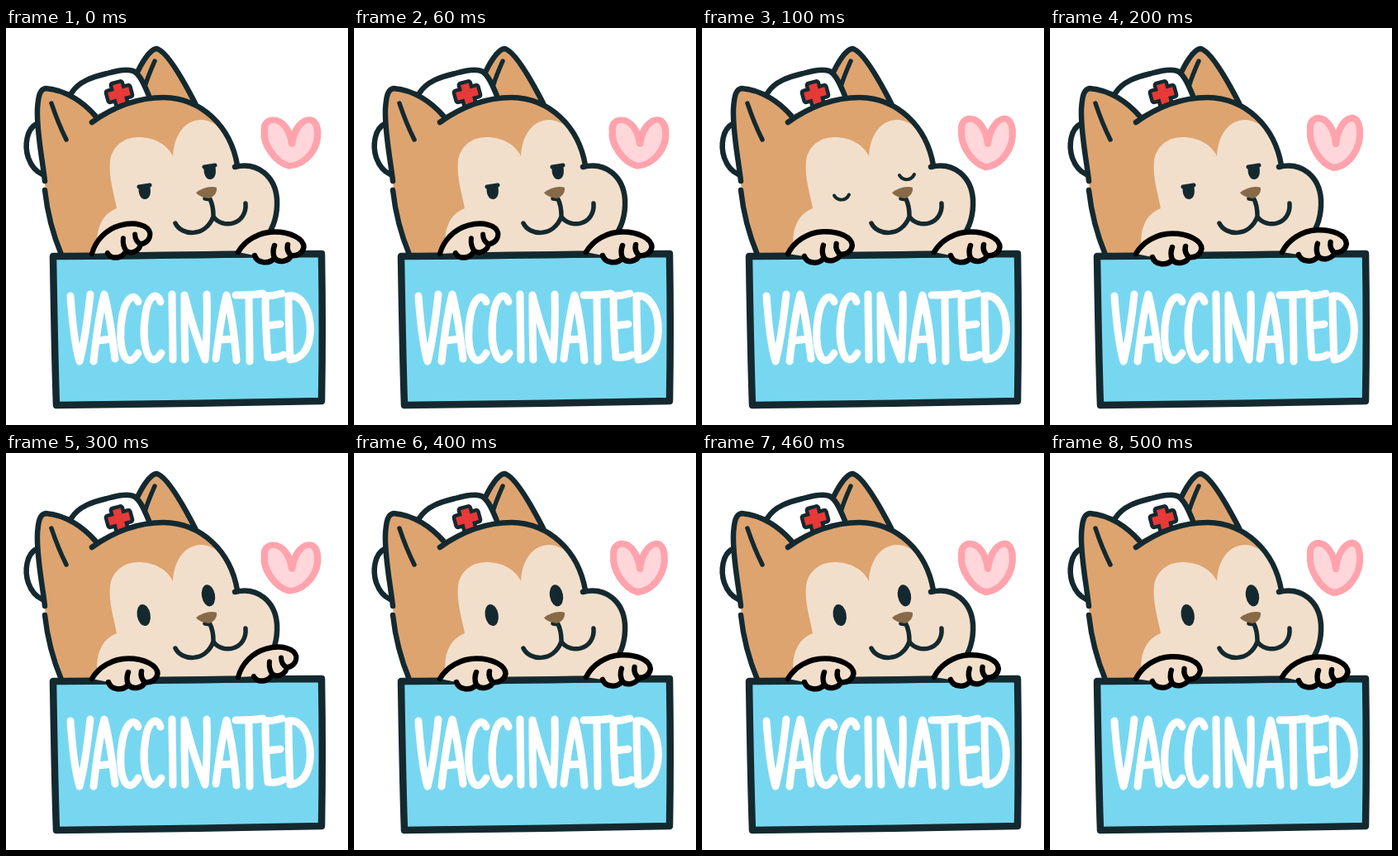
An HTML page with a canvas for the animation above (600 ms loop, 414x480 px).

```html
<!DOCTYPE html>
<html lang="en">
<head>
<meta charset="utf-8">
<title>Vaccinated pup</title>
<style>
html, body { margin: 0; width: 100%; height: 100%; overflow: hidden; background: #fff; }
canvas { display: block; }
</style>
</head>
<body>
<canvas id="stage" width="414" height="480" role="img" aria-label="A dog holding a sign: VACCINATED"></canvas>
<script>
const ctx = document.getElementById('stage').getContext('2d');
const INK = '#14292f', TAN = '#dda470', CREAM = '#f2dfcb', SKY = '#78d7f0', PINK = '#ffa3ad';
const STEP = 100, STEPS = 6;

const shape = d => new Path2D(d);

const art = {
  farEar: shape('M157 58C164 42 174 26 182 25C194 27 213 60 229 91L200 100L160 84Z'),
  farEarLine: shape('M157 58C164 42 174 26 182 25C194 27 213 60 229 91'),
  farEarFold: shape('M180 40C176 49 172 58 168 71'),
  hatBack: shape('M37 116C25 122 22 142 27 157C31 168 37 174 44 177L60 140Z'),
  hatBackLine: shape('M37 116C25 122 22 142 27 157C31 168 37 174 44 177'),
  hat: shape('M79 79C88 64 106 59 122 55C136 51 150 49 156 53C163 58 168 70 173 82L104 116Z'),
  hatLine: shape('M79 79C88 64 106 59 122 55C136 51 150 49 156 53C163 58 168 70 173 82'),
  head: shape('M67 274C57 249 51 222 47 188C44 158 37 126 38 98C39 82 41 74 48 73C73 75 94 90 108 106C134 93 163 84 191 84C237 85 272 119 280 167C305 161 326 180 328 207C329 227 323 243 314 254L300 276Z'),
  mask: shape('M112 276C106 244 116 225 134 218C131 201 124 181 126 161C128 143 143 132 160 132C181 132 196 142 202 155C203 133 214 111 237 111C259 112 274 136 280 167C305 161 326 180 328 207C329 227 323 243 314 254L300 276Z'),
  earLine: shape('M47 185C44 158 37 126 38 98C39 82 41 74 48 73C73 75 94 90 108 106'),
  earFold: shape('M55 91C60 106 66 121 73 135'),
  sideLine: shape('M47 196C50 223 57 250 67 274'),
  topLine: shape('M104 114C132 94 163 84 191 84C237 85 272 119 280 166'),
  cheekLine: shape('M277 168C305 161 326 180 328 207C329 227 323 243 314 254'),
  cross: shape('M-5 -12H5V-5H13V5H5V12H-5V5H-13V-5H-5Z'),
  nose: shape('M230 199C236 194 248 190 255 193C256 199 251 205 245 206C239 205 233 203 230 199Z'),
  mouth: shape('M241 206L247 207C250 213 251 220 251 227M205 236C212 251 241 254 251 228C262 244 292 238 290 212'),
  sign: shape('M57 276C160 276 270 273 382 273C383 330 383 395 382 451C280 453 160 455 61 456C59 400 58 335 57 276Z'),
  paw: shape('M104 273C112 259 129 248.5 148 248.5C168 248.5 183.5 257 183.5 267C182 275 175 278 168 277C166 284 153 287 148 280C142 288 127 287 124 277Z'),
  pawLine: shape('M104 273C112 259 129 248.5 148 248.5C168 248.5 183.5 257 183.5 267C182 275 175 278 168 277C166 284 153 287 148 280C142 288 127 287 124 277M148 280C146 275 146 270 148 265M168 277C164 273 163 268 164 264'),
  heart: shape('M346 140C344 122 335 109 325 109C318 109 314 115 315 123C313 141 327 164 343 169C362 167 377 146 375 123C374 113 370 108 364 109C355 111 348 124 346 140Z')
};

const letters = [
  'M78 324C80 352 83 383 89 403C95 380 99 350 102 322',
  'M106 403C109 375 113 345 119 322C125 345 129 375 132 400M111 378L128 376',
  'M160 331C155 319 145 327 141 347C134 383 144 419 160 393',
  'M187 331C182 317 172 325 169 345C163 382 173 417 188 393',
  'M201 322C201 348 202 375 202 401',
  'M217 401C216 376 216 348 216 323C223 350 232 379 241 401C243 375 244 347 243 322',
  'M254 400C257 376 261 346 267 323C273 346 277 376 279 402M257 377L276 376',
  'M278 323C289 323 301 323 311 321M294 324C294 350 295 377 295 403',
  'M334 321C327 323 320 324 314 324C314 350 315 375 317 398C324 399 331 398 336 395M315 360L332 358',
  'M342 324C342 350 343 376 344 401C363 399 370 380 368 357C366 335 355 322 342 324'
].map(shape);

function fill(path, color) {
  ctx.fillStyle = color;
  ctx.fill(path);
}

function line(path, width = 6.5, color = INK) {
  ctx.lineWidth = width;
  ctx.strokeStyle = color;
  ctx.stroke(path);
}

function at(x, y, turn, draw) {
  ctx.save();
  ctx.translate(x, y);
  ctx.rotate(turn * Math.PI / 180);
  draw();
  ctx.restore();
}

function drawHead() {
  fill(art.farEar, TAN);
  line(art.farEarLine);
  line(art.farEarFold, 5.5);
  fill(art.hatBack, '#fff');
  line(art.hatBackLine);
  fill(art.hat, '#fff');
  line(art.hatLine);
  at(137, 79.5, -15, () => {
    line(art.cross, 9);
    fill(art.cross, '#e63a38');
  });
  fill(art.head, TAN);
  fill(art.mask, CREAM);
  [art.earLine, art.sideLine, art.topLine, art.cheekLine].forEach(p => line(p));
  line(art.earFold, 5.5);
  line(art.mouth, 5.5);
  fill(art.nose, '#876a48');
}

const closedEye = shape('M-9 -3C-5 4 5 4 9 -4');
const halfEye = shape('M-6 -6C-8 4 -3 11 2 10C8 9 9 1 7 -7Z');
const lid = shape('M-6 -5L7 -7');
const openEye = new Path2D();
openEye.ellipse(0, 0, 8, 13.2, 0, 0, Math.PI * 2);

function drawEyes(mood) {
  if (mood === 'closed') {
    at(169, 205.5, 0, () => line(closedEye, 4));
    at(248, 181, 0, () => line(closedEye, 4));
  } else if (mood === 'half') {
    for (const [x, y] of [[167, 197], [246, 173]]) {
      at(x, y, 0, () => {
        fill(halfEye, INK);
        line(lid, 5);
      });
    }
  } else {
    at(166.7, 196, -10, () => fill(openEye, INK));
    at(245, 172.3, -10, () => fill(openEye, INK));
  }
}

function drawSign() {
  fill(art.sign, SKY);
  line(art.sign, 8.5);
  letters.forEach(p => line(p, 9, '#fff'));
}

// A paw pivots on its wrist and foreshortens as it lifts around its peak step.
function drawPaw(dx, dy, peak, step) {
  const away = Math.abs(step - peak);
  const lift = [14, 3, 0, 0][Math.min(away, STEPS - away)];
  at(104 + dx, 273 + dy, 0, () => {
    ctx.scale(1 - lift * 0.005, 1);
    ctx.rotate(-lift * Math.PI / 180);
    ctx.translate(-104, -273);
    fill(art.paw, CREAM);
    line(art.pawLine, 6.5, '#000');
  });
}

function drawHeart(step) {
  const squash = [0.07, 0.025, 0][step % 3];
  at(345, 139, 0, () => {
    ctx.scale(1 + squash, 1 - squash);
    ctx.translate(-345, -139);
    fill(art.heart, '#ffd6da');
    line(art.heart, 8, PINK);
  });
}

function draw(step) {
  ctx.fillStyle = '#fff';
  ctx.fillRect(0, 0, 414, 480);
  ctx.lineCap = ctx.lineJoin = 'round';
  drawHead();
  drawEyes(['half', 'closed', 'half'][step] || 'open');
  drawSign();
  drawPaw(0, 0, 0, step);
  drawPaw(177, -2, 3, step);
  drawHeart(step);
}

let start;
function tick(now) {
  start ??= now;
  draw(Math.floor((now - start) / STEP) % STEPS);
  requestAnimationFrame(tick);
}
draw(0);
requestAnimationFrame(tick);
</script>
</body>
</html>
```
